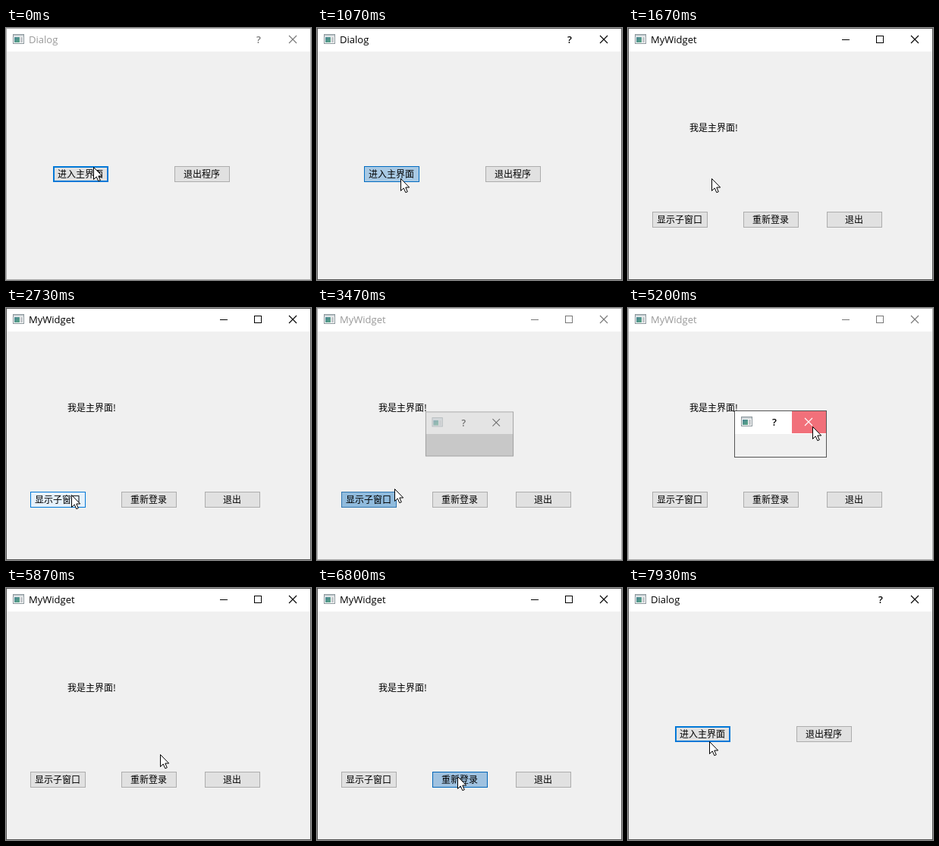
Recreate the animation shown at these times as an HTML page with a canvas. Size 402x332 px, loop 8 s.

```html
<!DOCTYPE html>
<html lang="zh-CN">
<head>
<meta charset="utf-8">
<title>Dialog</title>
<style>
html, body { margin: 0; width: 100%; height: 100%; overflow: hidden; background: #f0f0f0; }
canvas { display: block; }
</style>
</head>
<body>
<canvas id="stage" width="402" height="332"></canvas>
<script>
const ctx = document.getElementById('stage').getContext('2d');
const LOOP = 8000, TICK = 1000 / 15;
const UI_FONT = '"Open Sans", "Noto Sans", sans-serif';
const CJK_FONT = '12px "Noto Sans CJK SC", "Noto Sans CJK", sans-serif';

const linear = p => p;
const smooth = p => p * p * (3 - 2 * p);
const easeOut = p => p * (2 - p);

// Pointer moves: start, end, target x, target y, easing
const START = [115, 183];
const MOVES = [
  [0, 200, 110, 198, smooth],
  [2130, 2600, 86, 246, smooth],
  [3400, 4000, 222, 177, linear],
  [4000, 4200, 243, 156, easeOut],
  [5530, 6070, 185, 248, smooth],
  [6800, 6870, 185, 249, linear],
  [7530, 7930, 107, 202, smooth]
];

let time = 0;
const ramp = (from, to) => Math.min(1, Math.max(0, (time - from) / (to - from)));
const during = (from, to) => time >= from && time < to;

function rect(x, y, w, h, fill) {
  ctx.fillStyle = fill;
  ctx.fillRect(x, y, w, h);
}

function box(x, y, w, h, fill, border, line = 1) {
  rect(x, y, w, h, border);
  rect(x + line, y + line, w - 2 * line, h - 2 * line, fill);
}

function text(str, x, y, font, color = '#000', align = 'left') {
  ctx.font = font;
  ctx.fillStyle = color;
  ctx.textAlign = align;
  ctx.fillText(str, x, y);
}

function withAlpha(alpha, draw) {
  if (alpha <= 0) return;
  ctx.save();
  ctx.globalAlpha *= alpha;
  draw();
  ctx.restore();
}

function button(label, x, y, { hover = 0, press = 0, isDefault = false } = {}) {
  if (isDefault) box(x, y, 73, 21, '#e1e1e1', '#0078d7', 2);
  else box(x, y, 73, 21, '#e1e1e1', '#adadad');
  withAlpha(hover, () => box(x, y, 73, 21, '#e5f1fb', '#0078d7'));
  withAlpha(press, () => box(x, y, 73, 21, '#cce4f7', '#005499'));
  text(label, x + 36 - label.length * 6, y + 15, CJK_FONT);
}

function windowIcon(x, y) {
  box(x, y, 15, 13, '#fafafa', '#8c979c');
  rect(x + 1, y + 1, 13, 2, '#c9d0d4');
  const teal = ctx.createLinearGradient(x, y + 4, x + 6, y + 11);
  teal.addColorStop(0, '#4a7f96');
  teal.addColorStop(1, '#56a087');
  rect(x + 2, y + 4, 7, 7, teal);
  rect(x + 10, y + 4, 3, 7, '#c3c7ca');
}

function cross(x, y, color) {
  ctx.strokeStyle = color;
  ctx.lineWidth = 1.1;
  ctx.beginPath();
  ctx.moveTo(x - 5, y - 5);
  ctx.lineTo(x + 5, y + 5);
  ctx.moveTo(x + 5, y - 5);
  ctx.lineTo(x - 5, y + 5);
  ctx.stroke();
}

function frame(x, y, w, h, { title = '', active = true, help = false, close = 0, closeFill = '#e81123' }) {
  const right = x + w;
  const ink = active ? '#000' : '#777';
  box(x, y, w, h, '#f0f0f0', active ? '#555' : '#aaa');
  rect(x + 1, y + 1, w - 2, 30, '#fff');
  windowIcon(x + 9, y + 8);
  text(title, x + 30, y + 20, '13px ' + UI_FONT, active ? '#000' : '#999');
  if (help) {
    text('?', right - 69, y + 20, '600 13px ' + UI_FONT, ink, 'center');
  } else {
    rect(right - 120, y + 15, 10, 1, ink);
    box(right - 75, y + 10, 10, 10, '#fff', ink);
  }
  withAlpha(close, () => rect(right - 46, y + 1, 45, 29, closeFill));
  cross(right - 24, y + 15, close > 0.4 ? '#fff' : ink);
}

function loginDialog() {
  const opening = time < 1670;
  frame(0, 0, 402, 332, { title: 'Dialog', active: time >= 1070, help: true });
  button('进入主界面', 62, 182, {
    isDefault: true,
    hover: opening ? ramp(0, 270) : 0,
    press: opening ? ramp(1000, 1200) : 0
  });
  button('退出程序', 222, 182);
}

function mainWindow() {
  frame(0, 0, 402, 332, { title: 'MyWidget', active: !during(3400, 5270) });
  text('我是主界面!', 81, 136, CJK_FONT);
  const released = 1 - ramp(3330, 3600);
  button('显示子窗口', 32, 242, {
    hover: ramp(2470, 2730) * released,
    press: ramp(3070, 3200) * released
  });
  button('重新登录', 152, 242, { hover: ramp(5930, 6130), press: ramp(6730, 6870) });
  button('退出', 262, 242);
}

function childDialog() {
  const shown = ramp(3330, 3600), scale = 0.9 + 0.1 * shown;
  withAlpha(shown, () => {
    ctx.translate(201, 166);
    ctx.scale(scale, scale);
    ctx.translate(-201, -166);
    frame(140, 135, 122, 62, {
      help: true,
      close: ramp(4130, 4270),
      closeFill: time >= 5200 ? '#f1707a' : '#e81123'
    });
  });
}

function pointer() {
  let [x, y] = START;
  for (const [from, to, toX, toY, ease] of MOVES) {
    const p = ease(ramp(from, to));
    x += (toX - x) * p;
    y += (toY - y) * p;
  }
  ctx.save();
  ctx.translate(Math.round(x) + 0.5, Math.round(y) + 0.5);
  const arrow = new Path2D('M0 0V16L3.7 12.4L6.3 18.2L8.8 17.2L6.3 11.5H11.2Z');
  ctx.fillStyle = '#fff';
  ctx.fill(arrow);
  ctx.strokeStyle = '#000';
  ctx.lineWidth = 1;
  ctx.stroke(arrow);
  ctx.restore();
}

function render(now) {
  const tick = Math.floor((now % LOOP + 4) / TICK);
  time = Math.round(tick * TICK / 10) * 10;
  if (during(1670, 7000)) mainWindow();
  else loginDialog();
  if (during(3400, 5270)) childDialog();
  pointer();
  requestAnimationFrame(render);
}

render(performance.now());
</script>
</body>
</html>
```
